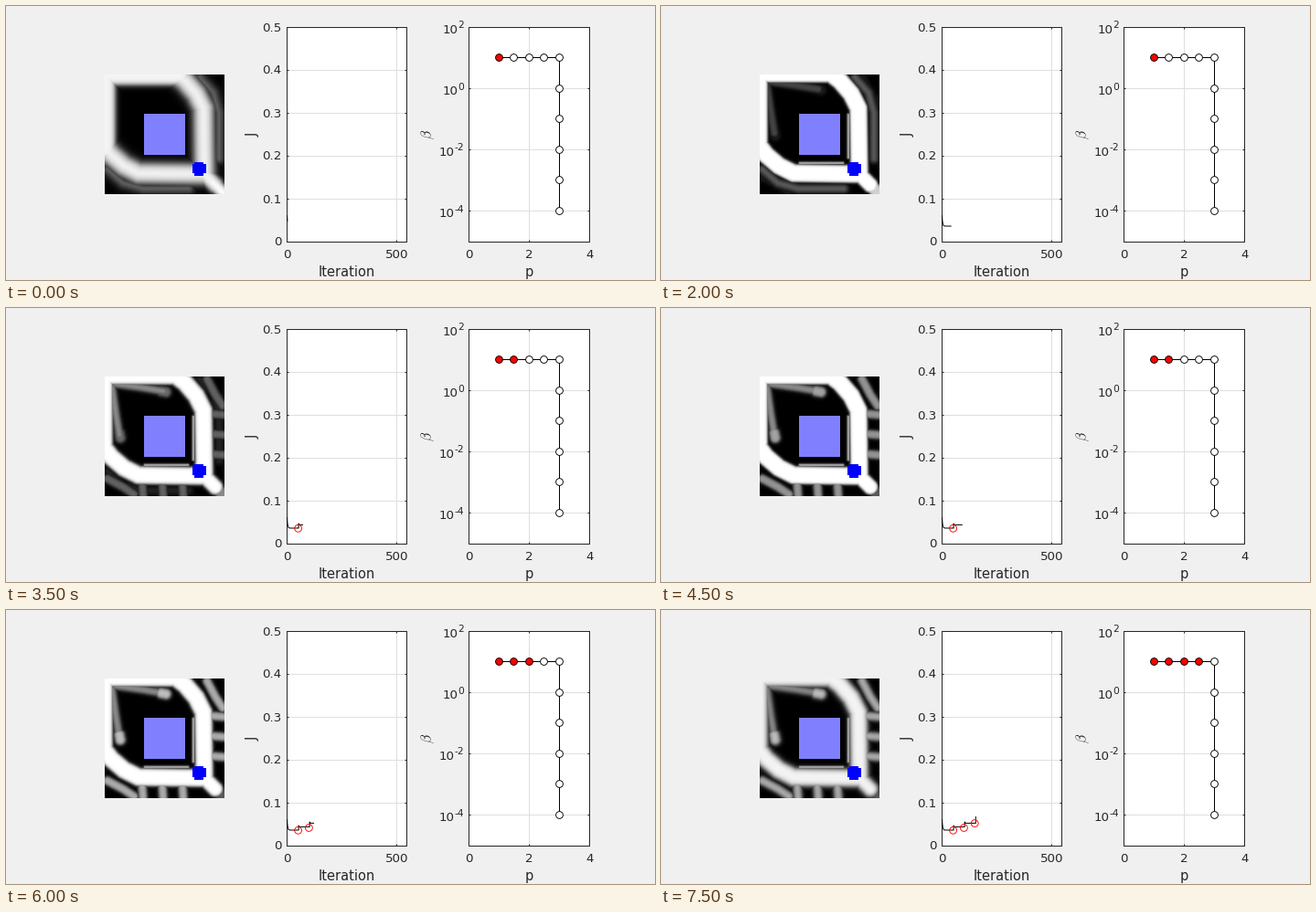
A matplotlib script that plays this animation: 710x300 px, repeating every 8 s.

```python
import numpy as np
import matplotlib.pyplot as plt
from matplotlib.animation import FuncAnimation
from matplotlib.patches import Circle, Polygon, Rectangle

W, H, DPI = 710, 300, 100
FRAMES, STEP = 16, 5          # total frames, frames per continuation step
PX = 72 / DPI                 # one pixel in points
INK = "#262626"

plt.rcParams["font.family"] = "DejaVu Sans"
plt.rcParams["mathtext.fontset"] = "cm"
plt.rcParams["path.snap"] = False

fig = plt.figure(figsize=(W / DPI, H / DPI), dpi=DPI, facecolor="#f0f0f0")
ax = fig.add_axes([0, 0, 1, 1])
ax.axis("off")


def line(xs, ys, color=INK, z=2):
    return ax.plot(xs, ys, color=color, lw=PX, zorder=z, snap=False,
                   solid_capstyle="butt")[0]


def box(x0, y0, x1, y1, **kw):
    ax.add_patch(Rectangle((x0, y0), x1 - x0, y1 - y0, snap=False, **kw))


def label(x, y, s, size=13.33, ha="center", va="baseline", **kw):
    ax.text(x, y, s, fontsize=size * PX, ha=ha, va=va, color=INK, **kw)


def ring(x, y, edge, face, z):
    return ax.add_patch(Circle((x, y), 3.9, ec=edge, fc=face,
                               lw=0.9 * PX, zorder=z))


def panel(x0, x1, xticks, yticks):
    y0, y1 = 23.5, 258.5
    box(x0, y0, x1, y1, fc="white", lw=0)
    for x in xticks:
        if x0 < x < x1:
            line([x, x], [y0, y1], "#dfdfdf", 1.5)
        line([x, x], [y1, y1 - 2])
        line([x, x], [y0, y0 + 2])
    for y in yticks:
        if y0 < y < y1:
            line([x0, x1], [y, y], "#dfdfdf", 1.5)
        line([x0, x0 + 2], [y, y])
        line([x1, x1 - 2], [y, y])
    box(x0, y0, x1, y1, fc="none", ec=INK, lw=PX, zorder=3)


# Objective history panel
j_ticks = [258.5 - 47 * i for i in range(6)]
panel(307.5, 438.5, [307.5, 427.5], j_ticks)
for y, s in zip(j_ticks, ["0", "0.1", "0.2", "0.3", "0.4", "0.5"]):
    label(301.5, y + 4, s, ha="right")
label(307.2, 276.3, "0")
label(427.2, 276.3, "500")
label(372.5, 296, "Iteration", 14.67)
label(270.5, 140.5, "J", 14.67, va="center", rotation=90)


# Continuation path panel, aligned to pixel centres
def p_x(p):
    return np.floor(506 + 33 * p) + 0.5


def beta_y(e):
    return np.floor(23 + 235 / 7 * (2 - e)) + 0.5


panel(506.5, 638.5, [p_x(p) for p in (0, 2, 4)],
      [beta_y(e) for e in (2, 0, -2, -4)])
for p in (0, 2, 4):
    label(p_x(p) - 0.3, 276.3, str(p))
for e in (2, 0, -2, -4):
    s = str(e)
    label(500.7, beta_y(e) + 1, s, 10.67, ha="right")
    label(494.4 - 3.8 * (len(s) - 1), beta_y(e) + 6.5, "10", ha="right")
label(571.8, 296, "p", 14.67)
label(462, 140.5, r"$\beta$", 15.5, va="center", rotation=90)

path = [(1 + i / 2, 1) for i in range(5)] + [(3, -i) for i in range(5)]
line([p_x(p) for p, _ in path], [beta_y(e) for _, e in path], "black", 4)
stops = [ring(p_x(p), beta_y(e), "black", "white", 5) for p, e in path]

# Density field, symmetric about its main diagonal
N = 131
gx, gy = np.meshgrid(np.arange(N) + 0.5, np.arange(N) + 0.5)


def dist(*pts):
    """Distance from every cell to a polyline and its mirror image."""
    best = np.full(gx.shape, 1e3)
    for (x0, y0), (x1, y1) in zip(pts, pts[1:]):
        dx, dy = x1 - x0, y1 - y0
        t = ((gx - x0) * dx + (gy - y0) * dy) / (dx * dx + dy * dy)
        t = np.clip(t, 0, 1)
        best = np.minimum(best, np.hypot(gx - x0 - t * dx, gy - y0 - t * dy))
    return np.minimum(best, best.T)


SIDE = dist((1, 1), (1, 82))
BAND = dist((-3, 75), (7, 88), (21, 100), (37, 108), (109, 109))
TAIL = dist((109, 109), (121, 121))
TIP = dist((118, 118), (132, 132))
HALO = dist((3, 104), (20, 119), (42, 125), (92, 125))
FINGERS = [dist((118, y), (131, y + 1)) for y in (41, 63, 85)]
FINGERS.append(dist((112, 3), (121, 20), (129, 32)))
SPUR = dist((8, 12), (12, 40), (16, 64))
BULB = dist((16, 62), (17, 67))
EDGE = dist((44, 97), (91, 97))


def ramp(k, a, b):
    return float(np.clip((k - a) / (b - a), 0, 1))


def density(k):
    n = k % STEP
    soft = (1.7, 1.3, 1.0, 0.9, 0.8)[n]
    body = 0.96 if n == 0 else 1.0
    grown = ramp(k, 3, 10)
    start = 1 - ramp(k, 0, 2)
    rho = np.zeros((N, N))

    def add(d, half, level=1.0, s=soft):
        np.maximum(rho, level / (1 + np.exp((d - half) / s)), out=rho)

    add(SIDE, 7.5 + 3 * start, body)
    add(BAND, 9.5 + start, body, soft + start)
    add(TAIL, 8, body)
    add(TIP, 7, 1 - 0.65 * ramp(k, 2, 9))
    add(HALO, 4, 0.45 * (1 - ramp(k, 3, 9)), 1.6 + start)
    add(SPUR, 4, 0.55 * ramp(k, 1, 7), 0.8 + soft / 3)
    add(BULB, 5.5, 0.75 * grown, 0.8 + soft / 3)
    add(EDGE, 1.2, 0.8 * ramp(k, -1, 4), 0.6)
    for d in FINGERS:
        add(d, 4.5, 0.68 * grown, 0.7 + soft / 3)
    return rho


field = ax.imshow(np.zeros((N, N)), cmap="gray", vmin=0, vmax=1,
                  extent=(108, 239, 206, 75), interpolation="nearest",
                  aspect="auto", zorder=2)
ax.set_xlim(0, W)
ax.set_ylim(H, 0)
box(151, 118, 196, 163, fc="#8080ff", lw=0, zorder=3)
ax.add_patch(Polygon([(206, 171), (216, 171), (216, 173), (219, 173),
                      (219, 183), (216, 183), (216, 186), (206, 186),
                      (206, 183), (204, 183), (204, 173), (206, 173)],
                     fc="#0000ff", lw=0, zorder=3))

# Objective curve: each step jumps up, then settles on a new level
TOPS = (229, 236, 232, 226)
BASES = (241, 237.4, 233.4, 229)
curve = line([], [], "black", 4)
marks = [ring(319.6 + 11.8 * i, y, "red", "none", 5)
         for i, y in enumerate((241.3, 238.5, 233.6))]


def end_x(k):
    return 308 + 2.42 * k


def history(k):
    xs, ys = [], []
    for i in range(k // STEP + 1):
        a = end_x(STEP * i) if i else 307.5
        b = end_x(min(k, STEP * (i + 1)))
        x = np.linspace(a, b, 60) if b > a else np.array([a])
        tau = 0.3 if i else 0.6
        xs.append(x)
        ys.append(BASES[i] - (BASES[i] - TOPS[i]) * np.exp((a - x) / tau))
    return np.concatenate(xs), np.concatenate(ys)


def update(k):
    step = k // STEP
    field.set_data(density(k))
    curve.set_data(*history(k))
    for i, m in enumerate(marks):
        m.set_visible(i < step)
    for i, c in enumerate(stops):
        c.set_facecolor("red" if i <= step else "white")
    return [field, curve, *marks, *stops]


anim = FuncAnimation(fig, update, frames=FRAMES, init_func=lambda: update(0),
                     interval=500, repeat=True, repeat_delay=0, blit=False)
plt.show()
```
